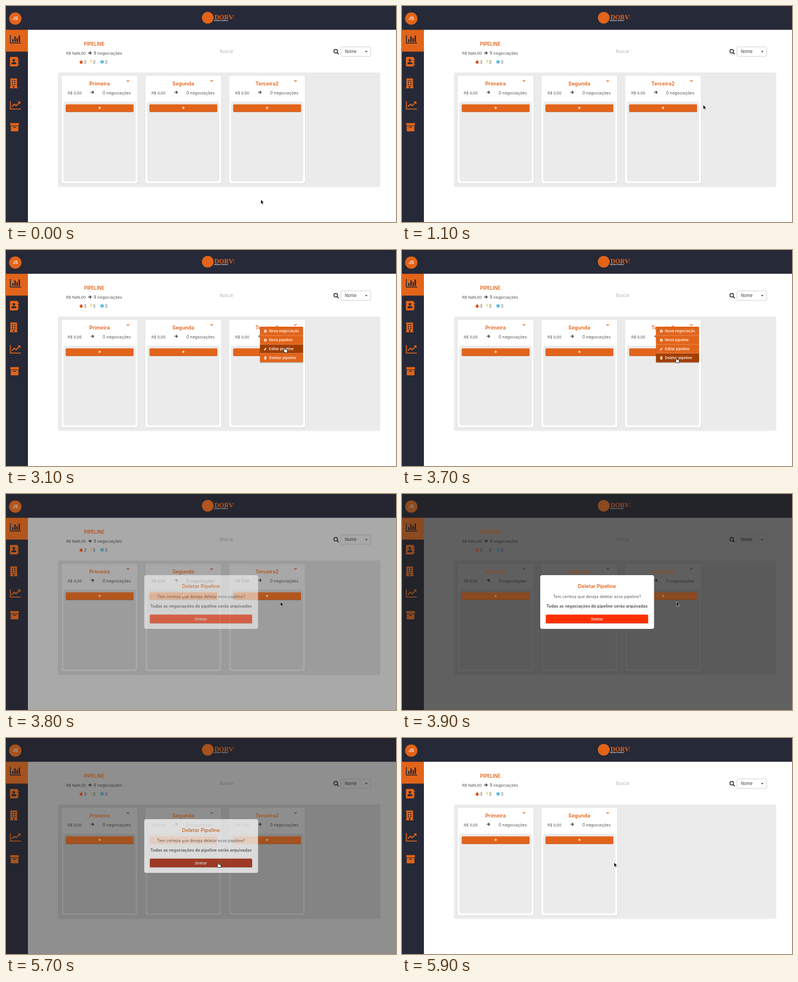
Animation of 694 by 386 pixels, one loop 7500 ms. Source, as an HTML page:

```html
<!DOCTYPE html>
<html lang="pt-BR">
<head>
<meta charset="utf-8">
<title>Pipeline</title>
<style>
  html, body { margin: 0; width: 100%; height: 100%; overflow: hidden; background: #fff; }
  svg { display: block; width: 694px; height: 386px; }
  text { font-family: Inter, "Open Sans", sans-serif; }
  .brand { font-family: "Liberation Serif", serif; }
</style>
</head>
<body>
<svg id="stage" viewBox="0 0 694 386" xmlns="http://www.w3.org/2000/svg"></svg>
<script>
const LOOP = 7500, STEP = 100;
const ORANGE = "#e2641a";

// Page colours: normal, and behind the dialog
const palette = {
  bg: ["#ffffff", "#525252"],
  panel: ["#ebebeb", "#4d4d4d"],
  card: ["#ffffff", "#515151"],
  shade: ["#dadada", "#4b4b4b"],
  ink: ["#555555", "#2b2b2b"],
  dark: ["#3f3f3f", "#222222"],
  orange: [ORANGE, "#834820"],
  edge: ["#c2561a", "#6c3e20"],
  chevron: [ORANGE, "#3d3029"],
  head: ["#262938", "#232329"],
  mark: ["#ffffff", "#858585"],
  hint: ["#b4b4b4", "#474747"],
  line: ["#c6c6c6", "#525252"],
  fire: ["#e0501c", "#8a3a20"],
  bolt: ["#f5e04c", "#5c5a44"],
  snow: ["#2eaee0", "#2f5d70"]
};

const v = name => `var(--${name})`;
const rect = (x, y, w, h, fill, r = 0, extra = "") =>
  `<rect x="${x}" y="${y}" width="${w}" height="${h}" rx="${r}" fill="${fill}" ${extra}/>`;
const text = (x, y, str, size, fill, weight = 400, anchor = "start") =>
  `<text x="${x}" y="${y}" font-size="${size}" fill="${fill}" font-weight="${weight}" text-anchor="${anchor}">${str}</text>`;
const fill = (d, color) => `<path d="${d}" fill="${color}"/>`;
const stroke = (d, color, w = 1.3, cap = "butt") =>
  `<path d="${d}" fill="none" stroke="${color}" stroke-width="${w}" stroke-linecap="${cap}" stroke-linejoin="round"/>`;
const arrow = (x, y) => stroke(`M${x} ${y}h5.4m-2.5-2.6l2.6 2.6l-2.6 2.6`, v("dark"), 1.3);
const plus = (x, y, color, r = 2.3, w = 1.2) => stroke(`M${x - r} ${y}h${2 * r}M${x} ${y - r}v${2 * r}`, color, w);

function sidebar() {
  const o = v("orange"), h = v("head");
  let s = rect(0, 0, 694, 42.5, h) + rect(0, 0, 39, 386, h) + rect(0, 42.5, 39, 39, o);
  s += `<circle cx="16.5" cy="22.5" r="11" fill="${o}"/>` + text(16.5, 25.4, "JS", 7.8, v("mark"), 600, "middle");
  // bar chart
  s += stroke("M7.7 52V66.3H27", h, 1.5);
  [[11, 5], [14.8, 10], [18.6, 7], [22.4, 11.5]].forEach(([x, n]) => s += rect(x, 64.3 - n, 2.5, n, h));
  // contacts
  s += rect(7, 91, 14, 17, o, 1.6);
  [93.5, 98, 102.5].forEach(y => s += rect(20.5, y, 2, 3, o, .5));
  s += `<circle cx="14" cy="97" r="2.3" fill="${h}"/>` + fill("M9.8 104v-1.2q0-2.6 2.8-2.6h2.8q2.8 0 2.8 2.6v1.2z", h);
  // building
  s += rect(7.8, 129.5, 11.8, 17, o, .8) + rect(6.8, 145.4, 13.8, 1.6, o);
  for (let r = 0; r < 3; r++) for (let c = 0; c < 2; c++) s += rect(10.6 + c * 4, 132.3 + r * 3.7, 2, 2, h);
  s += rect(12.5, 143, 2.4, 3, h);
  // trend
  s += stroke("M7.7 170V184.3H26.5", o, 1.6) + stroke("M10.5 180L15 175.3L18 178.3L24 172.3", o, 1.9);
  s += fill("M20.6 170.6H25.6V175.6z", o);
  // archive
  return s + rect(7.5, 209.2, 15.6, 4.2, o, .8) + rect(8.5, 214.5, 13.6, 9.5, o, .8) + rect(12.7, 216, 5.2, 1.5, h, .7);
}

function logo() {
  return `<circle cx="359" cy="21" r="10.5" fill="${v("orange")}"/>
    <clipPath id="logoClip"><rect x="370" y="8" width="36" height="26"/></clipPath>
    <g clip-path="url(#logoClip)"><text class="brand" x="371" y="24" font-size="11.5" font-weight="700" fill="${v("orange")}">DORVE</text></g>`
    + text(370.5, 27.3, "Business solutions", 2.7, v("mark"), 600);
}

function summary() {
  let s = text(157, 70.8, "PIPELINE", 8.3, v("orange"), 600, "middle");
  s += text(107, 87.2, "R$ NaN,00", 6.8, v("ink")) + arrow(146.2, 84) + text(156, 87.2, "9 negociações", 7.3, v("ink"));
  s += fill("M133.4 96q3 2 3 4.4a2.7 2.7 0 0 1-5.4 0q0-1.6 1.1-2.5l.7 1q1-1.2.6-2.9z", v("fire"));
  s += fill("M150.6 96.2h2.2l-.7 2.5h1.6l-3 5 .6-3.7h-1.6z", v("bolt"));
  for (let a = 0; a < 180; a += 60)
    s += `<g transform="rotate(${a} 171 99.8)">` + stroke("M171 96.4v6.8m-1.3-6.1l1.3 1.2l1.3-1.2m-2.6 5.4l1.3-1.2l1.3 1.2", v("snow"), .8) + "</g>";
  [138.6, 154.6, 175.8].forEach(x => s += text(x, 102.5, "3", 7.3, v("ink")));
  return s;
}

function search() {
  return text(380.5, 84.2, "Buscar", 7.4, v("hint"))
    + `<circle cx="586.7" cy="80.8" r="3.2" fill="none" stroke="${v("dark")}" stroke-width="1.6"/>`
    + stroke("M589.2 83.3L592 86.1", v("dark"), 1.9)
    + rect(596, 73, 53, 17, v("card"), 2, `stroke="${v("line")}" stroke-width=".8"`)
    + text(603, 84.2, "Nome", 7.4, v("dark")) + fill("M638.9 80.6h4.4l-2.2 2.3z", v("dark"));
}

function column(x, name) {
  return `<g transform="translate(${x} 0)">`
    + rect(-.4, 125.6, 136, 192.4, v("shade"), 3) + rect(0, 125, 135, 192, v("card"), 3)
    + text(67.5, 141.8, name, 9.1, v("orange"), 600, "middle")
    + stroke("M115.8 132.7l2.2 2.2l2.2-2.2", v("chevron"), 1.3)
    + text(11, 157.8, "R$ 0,00", 6.7, v("ink")) + arrow(51.6, 154.2) + text(73, 157.8, "0 negociações", 7.25, v("ink"))
    + rect(3.3, 171, 128.5, 142.5, v("panel"), 4)
    + rect(7.5, 176.6, 120.5, 12.8, v("edge"), 1.5) + rect(7.5, 175.8, 120.5, 12.6, v("orange"), 1.5)
    + plus(67.6, 182, v("mark")) + "</g>";
}

const menuItems = ["Nova negociação", "Novo pipeline", "Editar pipeline", "Deletar pipeline"];
const MENU = { x: 452, y: 137, w: 76.5, row: 15.9 };

function menu() {
  const h = MENU.row * 4;
  let s = rect(MENU.x - .5, MENU.y + .6, MENU.w + 1, h + .8, "#00000038", 2) + rect(MENU.x, MENU.y, MENU.w, h, ORANGE, 1.5);
  menuItems.forEach((label, i) => {
    const y = MENU.y + i * MENU.row, mid = y + 8;
    s += rect(MENU.x, y, MENU.w, MENU.row, "#a23e00", i % 3 ? 0 : 1.5, 'class="hot" opacity="0"');
    if (i) s += rect(MENU.x, y - .3, MENU.w, .6, "#f0a473");
    s += text(468, mid + 2.3, label, 6.45, "#fff", 500);
    if (i < 2) s += `<circle cx="461.5" cy="${mid}" r="2.5" fill="#fff"/>` + plus(461.5, mid, ORANGE, 1.4, .8);
    else if (i === 2) s += stroke(`M459.8 ${mid + 1.8}l3.3-3.3`, "#fff", 1.6) + fill(`M458.8 ${mid + 2.7}l.5-1.9 1.4 1.4z`, "#fff");
    else s += rect(459.4, mid - 2.4, 4.2, .8, "#fff") + rect(460.7, mid - 2.9, 1.6, .7, "#fff") + rect(459.8, mid - 1.2, 3.4, 3.9, "#fff", .4);
  });
  return s;
}

function dialog() {
  return rect(246, 145, 202.5, 96, "#fff", 3.5)
    + text(347, 167.7, "Deletar Pipeline", 8.9, ORANGE, 600, "middle")
    + text(347, 185.6, "Tem certeza que deseja deletar esse pipeline?", 7.17, "#5c5c5c", 400, "middle")
    + text(347, 202.6, "Todas as negociações do pipeline serão arquivadas", 7.25, "#484848", 600, "middle")
    + rect(255.6, 216.4, 182.8, 15.4, "#00000045", 1.5)
    + rect(256, 215.5, 182, 15.5, "#ff3000", 1.5, 'id="confirm"')
    + text(347, 225.5, "Deletar", 6.2, "#fff", 500, "middle");
}

const stage = document.getElementById("stage");
stage.innerHTML = rect(0, 0, 694, 386, v("bg")) + sidebar() + logo() + summary() + search()
  + rect(92.5, 118.8, 573.5, 204.8, v("panel"), 2.5)
  + column(99, "Primeira") + column(248, "Segunda") + `<g id="third">${column(397, "Terceira2")}</g>`
  + `<g id="menu">${menu()}</g><g id="dialog">${dialog()}</g>
  <g id="cursor" stroke-linejoin="round">
    <path id="pointer" d="M0 0V7.8L1.8 6.1L3 8.8L4.3 8.2L3.1 5.6H5.5Z" fill="#000" stroke="#fff" stroke-width=".5"/>
    <path id="hand" d="M-.9 .8Q-.9 0 0 0T.9 .8V3.3Q2 2.9 2.4 3.6Q3.4 3.2 3.8 4Q5 3.8 5 5V6.6Q5 8 4.2 9H.2Q-.6 7.6 -2.4 5.6Q-2.6 4.4 -.9 5.2Z" fill="#fff" stroke="#000" stroke-width=".8"/>
  </g>`;

const el = id => document.getElementById(id);
const third = el("third"), menuBox = el("menu"), dialogBox = el("dialog"), confirmBtn = el("confirm");
const cursor = el("cursor"), pointer = el("pointer"), hand = el("hand");
const hot = [...document.querySelectorAll(".hot")];

// Cursor stops: time, x, y
const path = [
  [0, 453.5, 346], [700, 453.5, 346], [800, 460, 333], [900, 489, 276], [1000, 521, 213], [1100, 536, 176.7],
  [1200, 534.5, 159], [1300, 528, 146], [1400, 519, 137.5], [1500, 514, 133], [1700, 512.5, 132.2],
  [1900, 511.5, 134.5], [2600, 511.5, 134.8], [3400, 488.5, 192.7], [4200, 488.5, 192.7],
  [5000, 377.5, 222.5], [LOOP, 377.5, 222.5]
];
const clamp = n => Math.max(0, Math.min(1, n));
const ease = n => n * n * (3 - 2 * n);

function cursorAt(t) {
  const i = path.findIndex(p => p[0] > t);
  const [t0, x0, y0] = path[i - 1], [t1, x1, y1] = path[i];
  const p = (t - t0) / (t1 - t0), k = t1 - t0 > STEP ? ease(p) : p;
  return [x0 + (x1 - x0) * k, y0 + (y1 - y0) * k];
}

const rgb = hex => [1, 3, 5].map(i => parseInt(hex.slice(i, i + 2), 16));
function mix([a, b], k) {
  const to = rgb(b);
  return `rgb(${rgb(a).map((n, i) => Math.round(n + (to[i] - n) * k))})`;
}

function dimAt(t) {
  if (t < 3800 || t >= 5900) return 0;
  if (t < 4000) return t < 3900 ? .5 : .92;
  if (t < 5700) return 1;
  return t < 5800 ? .65 : .2;
}

const show = (node, on) => node.setAttribute("visibility", on ? "visible" : "hidden");

function draw(time) {
  const t = Math.floor((time % LOOP) / STEP) * STEP;
  const [x, y] = cursorAt(t), dim = dimAt(t);
  for (const name in palette) stage.style.setProperty("--" + name, mix(palette[name], dim));

  const menuOn = t >= 1900 && t < 3800;
  const row = menuOn && y > MENU.y ? Math.floor((y - MENU.y) / MENU.row) : -1;
  const onChevron = t < 3800 && Math.abs(x - 515) < 5 && Math.abs(y - 134) < 5;
  const onConfirm = t >= 4000 && t < 5800 && x > 256 && x < 438 && y > 215.5 && y < 231;

  menuBox.setAttribute("opacity", menuOn ? clamp((t - 1800) / 300) : 0);
  hot.forEach((r, i) => r.setAttribute("opacity", i === row ? 1 : 0));
  dialogBox.setAttribute("opacity", clamp(dim * 1.1));
  confirmBtn.setAttribute("fill", onConfirm ? "#a81d00" : "#ff3000");
  show(third, t < 5800);

  const isHand = row >= 0 || onChevron || onConfirm;
  show(hand, isHand);
  show(pointer, !isHand);
  cursor.setAttribute("transform", `translate(${x} ${y})`);
}

const start = performance.now();
function tick() {
  draw(performance.now() - start);
  requestAnimationFrame(tick);
}
tick();
</script>
</body>
</html>
```
